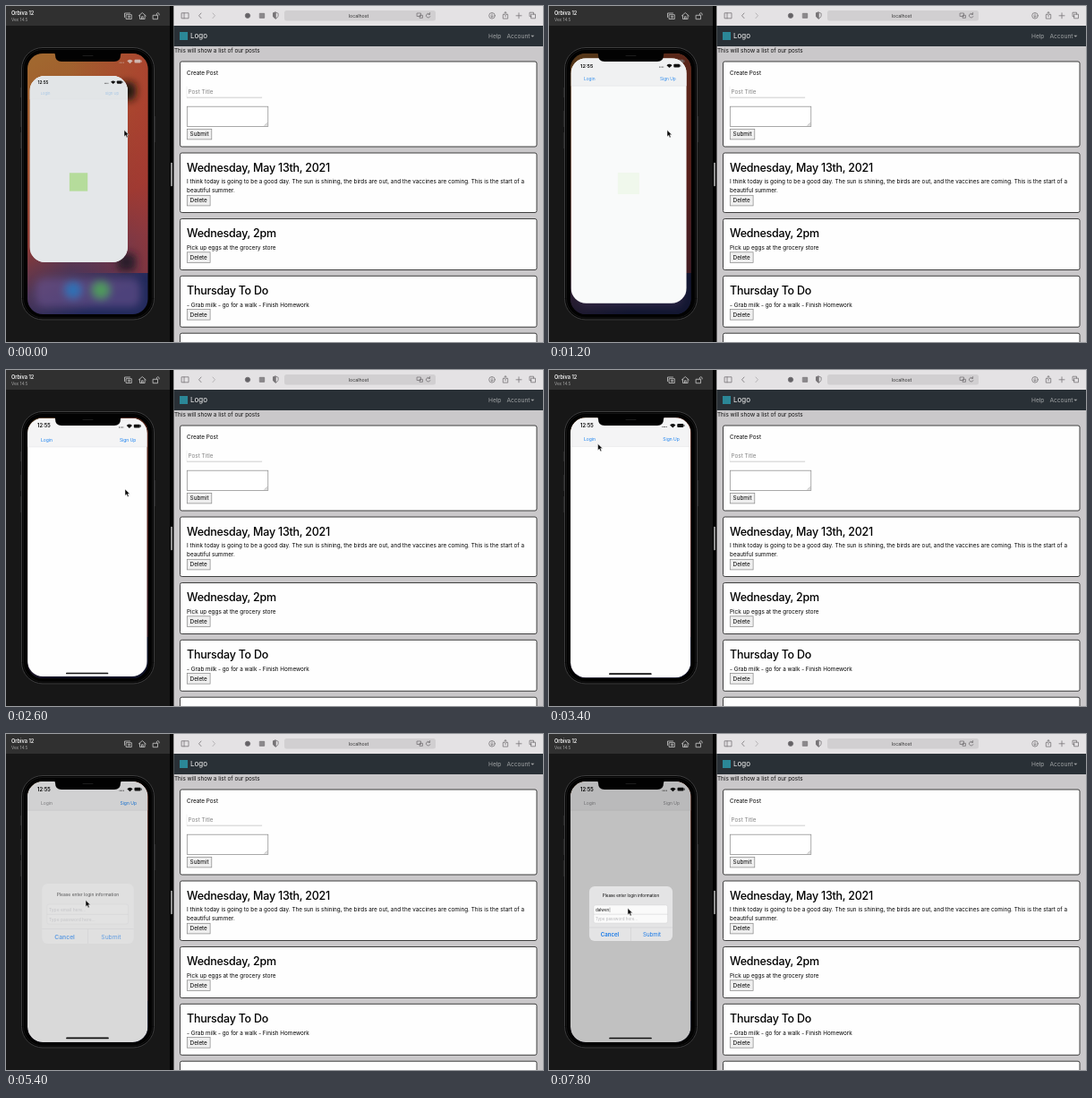
Animation of 600 by 375 pixels, one loop 8 s. Source, as an HTML page:

```html
<!DOCTYPE html>
<html lang="en">
<head>
<meta charset="utf-8">
<title>Posts app</title>
<style>
  html, body { margin: 0; width: 100%; height: 100%; overflow: hidden; background: #171717; }
  svg { display: block; width: 100vw; height: 100vh; }
  text { font-family: Inter, "Open Sans", sans-serif; font-size: 6.35px; white-space: pre; }
  .mid { text-anchor: middle; }
  .bold { font-weight: 600; }
  .line { fill: none; stroke-width: .8; stroke-linecap: round; stroke-linejoin: round; }
  .card { fill: #fefefe; stroke: #2c2c2c; stroke-width: .9; }
  .title { font-size: 12.5px; font-weight: 500; letter-spacing: -.02em; }
  .button rect { fill: #efefef; stroke: #858585; stroke-width: .7; }
  .nav text { font-size: 6.6px; fill: #a0a3a5; }
  .link { font-size: 5px; }
  .alert text { font-size: 4.5px; }
  .alert .action { font-size: 6.1px; fill: #1477e8; }
  .alert .hint { fill: #b9b9bc; }
</style>
</head>
<body>
<svg viewBox="0 0 600 375" preserveAspectRatio="none">
  <defs>
    <linearGradient id="wall" x1=".2" y1="0" x2=".45" y2="1">
      <stop offset="0" stop-color="#a1672f"/>
      <stop offset=".35" stop-color="#a2502d"/>
      <stop offset=".65" stop-color="#8c3a35"/>
      <stop offset=".83" stop-color="#4c3658"/>
      <stop offset="1" stop-color="#222a5c"/>
    </linearGradient>
    <linearGradient id="glow" x2="1">
      <stop offset=".35" stop-color="#b03a30" stop-opacity="0"/>
      <stop offset="1" stop-color="#b03a30" stop-opacity=".65"/>
    </linearGradient>
    <filter id="blur" x="-60%" y="-60%" width="220%" height="220%"><feGaussianBlur stdDeviation="4"/></filter>
    <clipPath id="screen"><rect x="24" y="53" width="134.5" height="291" rx="17"/></clipPath>
    <clipPath id="window"><rect id="windowShape"/></clipPath>
    <g id="signals">
      <path d="M127 63.2h4.5" class="line" stroke-dasharray=".1 1.4"/>
      <path d="M135.3 61.2q3.2-3 6.4 0l-3.2 3z" stroke="none"/>
      <rect x="143.5" y="59.8" width="7" height="3.8" rx="1" stroke="none"/>
      <path d="M151.2 61v1.4" class="line" stroke-width=".6"/>
    </g>
  </defs>

  <!-- Simulator panel -->
  <rect width="183" height="375" fill="#171717"/>
  <rect width="183" height="22" fill="#303030"/>
  <text x="6" y="10.3" class="bold" style="font-size:5.6px" fill="#f2f2f2">Orbiva 12</text>
  <text x="6" y="17" style="font-size:4.7px" fill="#a5a5a5">Vex 14.5</text>
  <g class="line" stroke="#c9c9c9">
    <path d="M132.5 12.5V8h6M134.5 9.7h5.8v4.8h-5.8z"/><circle cx="137.4" cy="12.1" r="1"/>
    <path d="M148.3 11l4-3.5 4 3.5M149.5 10.5v4h5.6v-4M151.5 14.3v-2.5h1.6v2.5"/>
    <path d="M164.5 10.3h5v4.4h-5zM168.3 10V8.6q1.4-2 2.8 0V10"/>
  </g>

  <!-- Phone -->
  <path d="M16.6 91v11M16.6 117v18M16.6 141v18M166.4 123v29" stroke="#292929" stroke-width="1.5"/>
  <rect x="17.5" y="46.5" width="148" height="303.5" rx="23.5" fill="#020202" stroke="#3c3c3d"/>
  <rect x="19.5" y="48.5" width="144" height="299.5" rx="21.5" fill="none" stroke="#151515"/>
  <g clip-path="url(#screen)">
    <rect x="24" y="53" width="135" height="291" fill="url(#wall)"/>
    <rect x="24" y="53" width="135" height="245" fill="url(#glow)"/>
    <g filter="url(#blur)">
      <rect x="33" y="304" width="117" height="32" rx="9" fill="#6b5390" opacity=".6"/>
      <circle cx="75" cy="317" r="10" fill="#2e6fb4"/>
      <circle cx="106" cy="317" r="10" fill="#4f9a5c"/>
      <rect x="124" y="85" width="21" height="20" rx="6" fill="#1c1210"/>
      <rect x="124" y="276" width="21" height="20" rx="6" fill="#2a1a2c"/>
    </g>
    <use href="#signals" fill="#ddd" stroke="#ddd" opacity=".75"/>
    <rect id="homeShade" x="24" y="53" width="135" height="291"/>

    <g clip-path="url(#window)">
      <g id="app">
        <rect x="24" y="53" width="134.5" height="291" fill="#fefefe"/>
        <rect x="24" y="53" width="134.5" height="32" fill="#f4f4f5"/>
        <path d="M24 85.2h134.5" stroke="#dedee0" stroke-width=".5"/>
        <text id="login" class="link" x="39" y="79.2">Login</text>
        <text id="signup" class="link" x="127.5" y="79.2">Sign Up</text>
        <g id="splash">
          <rect x="24" y="53" width="134.5" height="291" fill="#dcdfe2" opacity=".72"/>
          <rect x="78.5" y="186" width="25" height="25" fill="#b5dc9b"/>
        </g>
        <text x="35" y="63.7" class="bold" style="font-size:5.7px">12:55</text>
        <use href="#signals" fill="#111" stroke="#111"/>
        <path d="M68 339.5h46" stroke="#111" stroke-width="1.7" stroke-linecap="round"/>
      </g>
    </g>

    <rect id="dim" x="24" y="53" width="135" height="291"/>
    <g id="alert" class="alert">
      <rect x="45" y="170" width="93" height="61" rx="6" fill="#e5e5e6"/>
      <text x="91.5" y="182.4" class="mid">Please enter login information</text>
      <rect id="fields" x="50" y="191" width="82.5" height="20" rx="2" stroke="#cfcfd1" stroke-width=".4"/>
      <path d="M50 201.2h82.5M45 216h93M91.5 216v15" stroke="#cbcbcd" stroke-width=".5"/>
      <text x="52" y="197.8"><tspan id="email"></tspan><tspan id="caret" fill="#333">|</tspan></text>
      <text x="52" y="208.1" class="hint">Type password here...</text>
      <text x="68" y="226" class="mid action bold">Cancel</text>
      <text x="115" y="226" class="mid action">Submit</text>
    </g>
  </g>
  <path d="M53 52.5q2 0 2 2.2 0 7.3 7 7.3h59q7 0 7-7.3 0-2.2 2-2.2z" fill="#020202"/>
  <path d="M86 55.5h11" stroke="#1c1c1c" stroke-linecap="round"/>

  <path id="cursor" d="M0 0v7.2l1.7-1.5 1.2 2.7 1.3-.6-1.2-2.6h2.3z" fill="#080808" stroke="#eee" stroke-width=".5"/>

  <!-- Split view divider -->
  <rect x="183" width="4.5" height="375" fill="#020202"/>
  <path d="M185 175.5v25" stroke="#b5b5b5" stroke-width="1.6" stroke-linecap="round"/>

  <!-- Browser -->
  <rect x="187.5" width="412.5" height="375" fill="#cac8ca"/>
  <rect x="187.5" width="412.5" height="22" fill="#e4e2e4"/>
  <rect x="311" y="5" width="169" height="11.5" rx="2.5" fill="#d1cfd1"/>
  <text x="394" y="12.8" class="mid" style="font-size:5.3px" fill="#333">localhost</text>
  <g class="line" stroke="#767477">
    <path d="M196.5 7.8h7.5v6h-7.5zM199 7.8v6"/>
    <path d="M218 8l-2.5 2.8 2.5 2.8"/>
    <path d="M231 8l2.5 2.8-2.5 2.8" stroke="#aaa8aa"/>
    <circle cx="270" cy="10.8" r="2.7" fill="#646266"/>
    <rect x="283.7" y="8.3" width="5" height="5" fill="#8b898c"/>
    <path d="M301.3 7.2l2.8 1v3q-.7 2-2.8 3-2.1-1-2.8-3v-3z"/>
    <path d="M301.3 7.2v7q-2.1-1-2.8-3v-3z" fill="#767477"/>
    <path d="M459.5 8h4v3.5h-4zM462.5 10.3h3v3h-3z"/>
    <path d="M473.5 9.2a2.3 2.3 0 1 0 .4 2.4M473.6 7.5v1.9h-1.8"/>
    <circle cx="543" cy="10.8" r="3.3"/><path d="M543 8.9v3.5m-1.4-1.3l1.4 1.4 1.4-1.4"/>
    <path d="M556.7 9.5h-1.4v4.6h5.4V9.5h-1.4M558 11.8V6.8m-1.5 1.4l1.5-1.5 1.5 1.5"/>
    <path d="M570 10.8h6M573 7.8v6"/>
    <path d="M587 9.2h4.5v4.6H587zM587 11.7h-2V7.2h4.5v2"/>
  </g>
  <g class="nav">
    <rect x="187.5" y="22" width="412.5" height="23" fill="#293036"/>
    <rect x="194" y="29" width="9" height="9" fill="#2b8797"/>
    <text x="206" y="36.4" style="font-size:8px;fill:#f1f1f1">Logo</text>
    <text x="539" y="36">Help</text>
    <text x="559.5" y="36">Account</text>
    <path d="M586.3 32.7h4l-2 2.1z" fill="#a0a3a5"/>
  </g>
  <text x="188" y="52.3" fill="#111">This will show a list of our posts</text>
  <g id="posts">
    <rect class="card" x="194.5" y="62" width="398.5" height="95" rx="2"/>
    <text x="202" y="77">Create Post</text>
    <path d="M202 90v12.2h84" class="line" stroke="#eee"/>
    <path d="M202 102.2h84" stroke="#c5c5c5" stroke-width=".7"/>
    <text x="203.5" y="98.4" fill="#858585">Post Title</text>
    <rect x="202.3" y="112.2" width="90.5" height="22.3" fill="#fff" stroke="#858585" stroke-width=".7"/>
    <path d="M289 133.5l3-3M291 133.5l1-1" class="line" stroke="#999" stroke-width=".5"/>
  </g>
</svg>
<script>
const $ = id => document.getElementById(id);
const set = (id, attrs) => {
  for (const key in attrs) $(id).setAttribute(key, attrs[key]);
};
const clamp = v => Math.min(1, Math.max(0, v));
const ramp = (t, from, to) => clamp((t - from) / (to - from));
const lerp = (a, b, p) => a + (b - a) * p;

const button = (y, label, width) => `<g class="button">
  <rect x="202.3" y="${y}" width="${width}" height="11.6"/>
  <text class="mid" x="${202.3 + width / 2}" y="${y + 8.1}">${label}</text></g>`;

const post = (y, height, title, lines) => `<rect class="card" x="194.5" y="${y}" width="398.5" height="${height}" rx="2"/>
  <text class="title" x="202" y="${y + 20.8}">${title}</text>` +
  lines.map((line, i) => `<text x="202" y="${y + 34.4 + i * 10}">${line}</text>`).join('') +
  button(y + 27.3 + lines.length * 10, 'Delete', 25.8);

$('posts').insertAdjacentHTML('beforeend',
  button(137.3, 'Submit', 27.5) +
  post(164, 66.5, 'Wednesday, May 13th, 2021', [
    'I think today is going to be a good day. The sun is shining, the birds are out, and the vaccines are coming. This is the start of a',
    'beautiful summer.']) +
  post(237.5, 57, 'Wednesday, 2pm', ['Pick up eggs at the grocery store']) +
  post(301.3, 57, 'Thursday To Do', ['- Grab milk - go for a walk - Finish Homework']) +
  '<rect class="card" x="194.5" y="365.2" width="398.5" height="40" rx="2"/>');

// Cursor stops: time, x, y
const stops = [[0, 132, 138.5], [2400, 132, 138.5], [2600, 133, 133], [3600, 45.5, 76.5],
  [4600, 45.5, 76.5], [5300, 89, 185.5], [6400, 89, 185.5], [6800, 88, 194.5], [8000, 88, 194.5]];

function cursorAt(t) {
  const i = stops.findIndex(stop => stop[0] > t);
  const [a, b] = [stops[i - 1], stops[i]];
  const p = ramp(t, a[0], b[0]);
  const eased = p * p * (3 - 2 * p);
  return [lerp(a[1], b[1], eased), lerp(a[2], b[2], eased)];
}

function tint(p) {
  const blue = [24, 128, 240], gray = [142, 142, 146];
  return `rgb(${blue.map((c, i) => Math.round(lerp(c, gray[i], p)))})`;
}

function drawApp(t) {
  const rest = Math.exp(-t / 775);
  const x = 24 + 2.5 * rest, y = 53 + 25 * rest;
  const width = 134.5 - 25 * rest, height = 291 - 83 * rest;
  set('windowShape', { x, y, width, height, rx: 17 });
  set('app', { transform: `translate(${x} ${y}) scale(${width / 134.5}) translate(-24 -53)` });
  set('splash', { opacity: (1 - ramp(t, 0, 2100)) ** 2 });
  set('homeShade', { opacity: .6 * (1 - rest) });
}

function drawAlert(t) {
  const phase = Math.max(0, t - 4500) / 438;
  const rest = (1 + phase) * Math.exp(-phase);
  set('dim', { opacity: .24 * (1 - rest) });
  set('alert', {
    opacity: 1 - rest,
    transform: `translate(91.5 200.5) scale(${1 + .26 * rest}) translate(-91.5 -200.5)`
  });
  set('login', { fill: tint(ramp(t, 4500, 5200)) });
  set('signup', { fill: tint(ramp(t, 5400, 6400)) });

  const count = [0, 1, 2, 3, 4, 6][Math.max(0, Math.round((t - 6800) / 200))];
  $('email').textContent = count ? 'dalwen'.slice(0, count) : 'Type email here...';
  set('email', { fill: count ? '#111' : '#b9b9bc' });
  set('caret', { opacity: count ? 1 : 0 });
  set('fields', { fill: tint.call && `rgba(255,255,255,${lerp(.1, .85, ramp(t, 5400, 6600))})` });
}

function draw() {
  const t = Math.floor(performance.now() % 8000 / 200) * 200;
  drawApp(t);
  drawAlert(t);
  set('cursor', { transform: `translate(${cursorAt(t)})` });
  requestAnimationFrame(draw);
}
draw();
</script>
</body>
</html>
```
